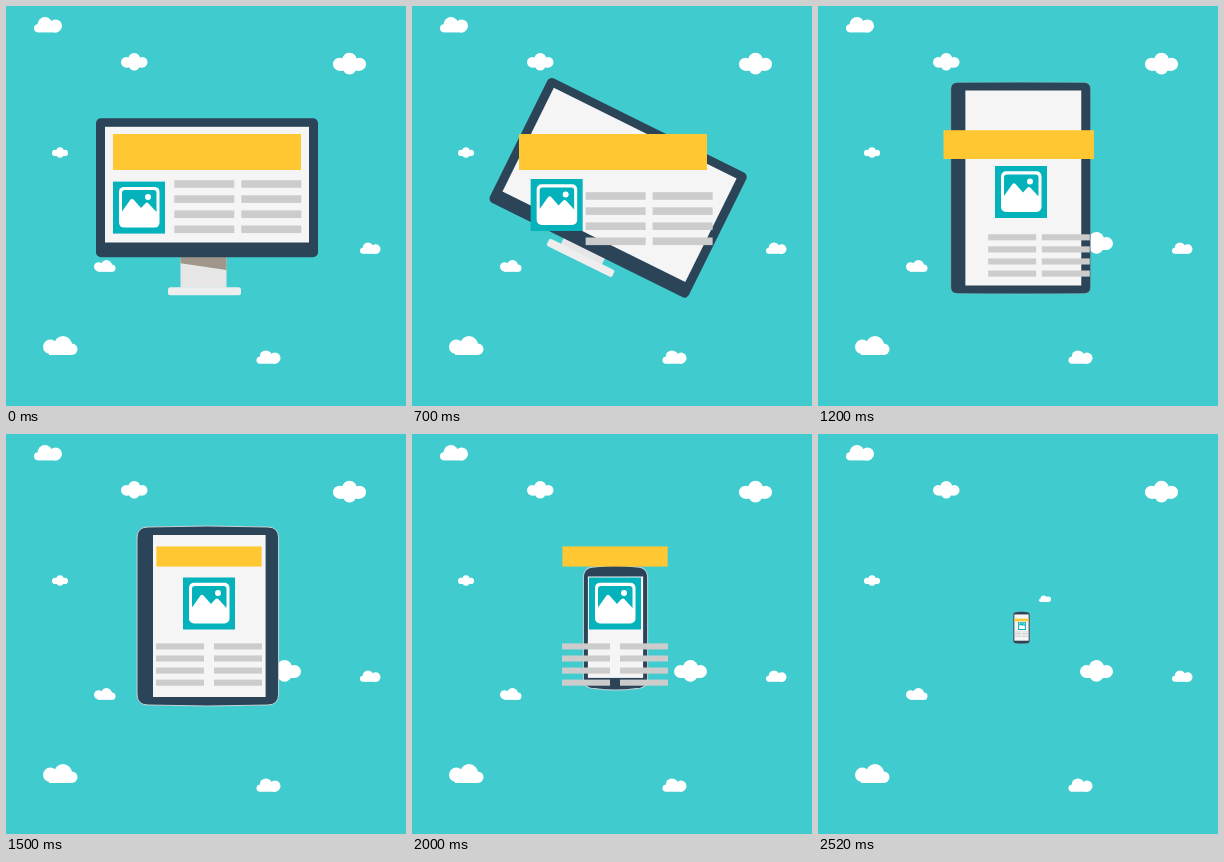
An HTML page that plays this animation: 400 px wide and 400 px high, repeating every 3.52 s.

```html
<!DOCTYPE html>
<html lang="en">
<head>
<meta charset="utf-8">
<title>Responsive layout</title>
<style>
  html, body { margin: 0; width: 100%; height: 100%; overflow: hidden; background: #40cbce; }
  svg { display: block; width: 100vw; height: 100vh; }
</style>
</head>
<body>
<svg id="stage" viewBox="0 0 400 400">
  <g id="clouds" fill="#fff"></g>
  <g id="monitor">
    <g id="stand">
      <path d="M-26.5 60H19.5V100H-26.5Z" fill="#e6e6e6"/>
      <path d="M-26.5 60H19.5V82.3L-26.5 75.5Z" fill="#a0978a"/>
      <rect x="-39" y="99.5" width="73" height="8" rx="2.5" fill="#eeeeee"/>
    </g>
    <rect x="-111" y="-69.5" width="222" height="139" rx="5" fill="#2c4458"/>
    <rect x="-102" y="-61" width="204" height="115.7" fill="#f5f5f5"/>
  </g>
  <g id="tablet">
    <path id="shell" fill="#2c4458" stroke="#c4d4d7"/>
    <rect id="glass" fill="#f5f5f5"/>
  </g>
  <g id="phone">
    <path id="case" fill="#2c4458" stroke="#c4d4d7"/>
    <rect x="-27.5" y="-51" width="55" height="101" fill="#f5f5f5"/>
  </g>
  <rect id="banner" x="-94" y="-18" width="188" height="36" fill="#ffc832"/>
  <g id="image">
    <rect x="-26" y="-26" width="52" height="52" fill="#04b2bb"/>
    <rect x="-20" y="-20.7" width="40.5" height="40.7" rx="5" fill="#fff"/>
    <path d="M-17 -14.5Q-17 -17.5 -14 -17.5H14.5Q17.5 -17.5 17.5 -14.5V4.5L9.5 -4.2Q8 -5.8 6.3 -4.2L2 .5L-5.5 -8Q-7 -9.5 -8.5 -8L-17 4Z" fill="#04b2bb"/>
    <circle cx="9" cy="-10.5" r="3" fill="#fff"/>
  </g>
  <g id="text" fill="#cccccc"></g>
</svg>
<script>
const LOOP = 3520;

// Each part starts at a pose (centre x, centre y, scale, column gap)
// and is led to further poses, each between two times.
const PARTS = {
  banner: {
    from: [201, 146, 1],
    moves: [[1000, 1200, 200.7, 138.6, .8], [1200, 1500, 203, 122.5, .56], [2360, 2520, 203.3, 186, .073]]
  },
  image: {
    from: [133, 201.6, 1],
    moves: [[600, 1200, 203, 186, 1], [1200, 1500, 203, 169.5, 1], [2360, 2520, 204, 192, .154]]
  },
  text: {
    from: [231.8, 200.6, 1, 7],
    moves: [[600, 900, 247.8, 236.6, 1, 7], [900, 1200, 221, 249.4, .8, 7],
      [1200, 1500, 203, 230.5, .8, 12.5], [2360, 2520, 203.3, 200.2, .1, 9]]
  }
};

// Cloud shapes as circles: cx, cy, r
const SHAPES = {
  left: { w: 34.5, base: 19, puffs: [[7.3, 10.8, 7.3], [20, 9, 9], [28.7, 13.2, 5.8]] },
  right: { w: 34.5, base: 19, puffs: [[5, 14, 5], [13.5, 9, 9], [26.5, 11, 8]] },
  round: { w: 33, base: 18, puffs: [[6.5, 11.5, 6.5], [16.5, 7.5, 7.5], [26.5, 11.5, 6.5], [16.5, 15, 6.8]] }
};
const CLOUDS = [
  ['right', 28, 11, 28], ['round', 115, 47, 26.5], ['round', 327, 46.7, 33],
  ['round', 46, 141.3, 16], ['left', 88, 254, 21.5], ['right', 354, 236.5, 20.5],
  ['left', 37, 330, 34.5], ['right', 250.5, 344.5, 24], ['round', 262, 226, 33],
  ['right', 221, 161.4, 12]
];

const $ = id => document.getElementById(id);
const mix = (a, b, k) => a + (b - a) * k;
const progress = (t, a, b) => Math.min(1, Math.max(0, (t - a) / (b - a)));

function set(el, attrs) {
  for (const name in attrs) el.setAttribute(name, attrs[name]);
}

function add(parent, tag, attrs = {}) {
  const el = document.createElementNS('http://www.w3.org/2000/svg', tag);
  set(el, attrs);
  return parent.appendChild(el);
}

function place(id, x, y, scale = 1, angle = 0) {
  set($(id), { transform: `translate(${x} ${y}) rotate(${angle}) scale(${scale})` });
}

const show = (id, on) => { $(id).style.display = on ? '' : 'none'; };

// Rounded box whose top and bottom edges swell outwards.
function casing(x, y, w, h, r, swell) {
  const R = x + w, B = y + h, cx = x + w / 2;
  return `M${x + r} ${y}Q${cx} ${y - swell} ${R - r} ${y}Q${R} ${y} ${R} ${y + r}V${B - r}` +
    `Q${R} ${B} ${R - r} ${B}Q${cx} ${B + swell} ${x + r} ${B}Q${x} ${B} ${x} ${B - r}V${y + r}Q${x} ${y} ${x + r} ${y}Z`;
}

function pose({ from, moves }, t) {
  return moves.reduce((now, [a, b, ...to]) => now.map((v, i) => mix(v, to[i], progress(t, a, b))), from);
}

for (const [kind, x, y, w] of CLOUDS) {
  const { w: full, base, puffs } = SHAPES[kind];
  const g = add($('clouds'), 'g', { transform: `translate(${x} ${y}) scale(${w / full})` });
  for (const [cx, cy, r] of puffs) add(g, 'circle', { cx, cy, r });
  add(g, 'rect', { x: 6, y: 10, width: full - 12, height: base - 10 });
}

const bars = Array.from({ length: 8 }, (_, i) =>
  add($('text'), 'rect', { y: -26.4 + (i >> 1) * 15.1, width: 60, height: 7.6 }));

set($('case'), { d: casing(-32, -60.5, 64, 121, 11, 3) });

function drawMonitor(t) {
  const u = progress(t, 400, 1100);
  place('monitor', 201 + 2 * u + 4.4 * Math.sin(Math.PI * u), 181.8, 1, 90 * u ** 1.45);
  place('stand', 0, -56 * u);
}

function drawTablet(t) {
  const k = progress(t, 1100, 1500);
  const w = mix(139, 141.6, k), h = mix(222, 178, k);
  const x = mix(203, 201.8, k) - w / 2, y = 182 - h / 2;
  const left = mix(14, 16, k), right = mix(8, 13, k);
  set($('shell'), { d: casing(x, y, w, h, mix(5, 11, k), 2 * k), 'stroke-width': k });
  set($('glass'), { x: x + left, y: y + 8, width: w - left - right, height: h - 16 });
}

function draw(t) {
  show('monitor', t < 1100);
  show('tablet', t >= 1100 && t < 1800);
  show('phone', t >= 1800);
  drawMonitor(t);
  drawTablet(t);
  place('phone', 203.5, 193.7, mix(1.5, .26, progress(t, 1800, 2300)));

  for (const id in PARTS) {
    const [x, y, scale, gap] = pose(PARTS[id], t);
    place(id, x, y, scale);
    if (gap) bars.forEach((bar, i) => set(bar, { x: i % 2 ? gap / 2 : -60 - gap / 2 }));
  }
}

// Motion advances in 100 ms steps, then 40 ms steps for the final shrink.
function step(t) {
  const [from, size] = t < 2400 ? [0, 100] : [2400, 40];
  return from + Math.floor((t - from) / size) * size;
}

const start = performance.now();

function frame() {
  draw(step((performance.now() - start) % LOOP));
  requestAnimationFrame(frame);
}
frame();
</script>
</body>
</html>
```
